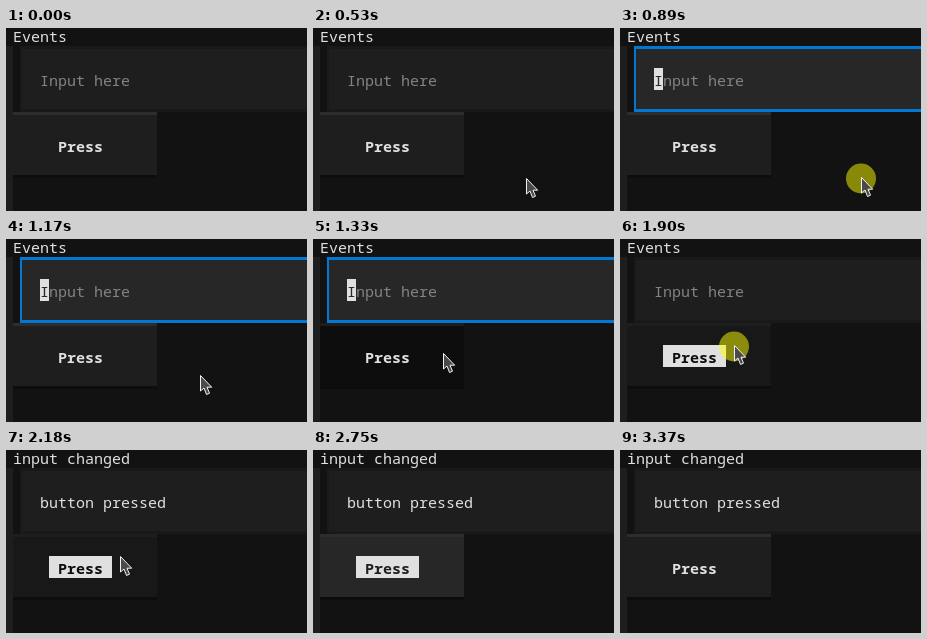
Write an HTML page that moves like this. It is 301 px wide and 183 px high and loops after 3.45 s.

```html
<!DOCTYPE html>
<html lang="en">
<head>
<meta charset="utf-8">
<title>Terminal events demo</title>
<style>
html, body { margin: 0; width: 100%; height: 100%; overflow: hidden; background: #121212; }
svg { display: block; width: 301px; height: 183px; }
text { font: 15px "Noto Sans Mono", monospace; fill: #e0e0e0; white-space: pre; }

.scene, .field, .button, .pointer, .halo, .caret { animation: 3450ms step-end infinite; }
.scene { animation-name: scene; }
.field { animation-name: field; }
.button { animation-name: button; }
.pointer { animation-name: move; }
.halo { animation-name: click; fill: #ff0; }
.caret { animation-name: blink; }

.before { opacity: var(--before); }
.after { opacity: var(--after); }
.hint { fill: #828484; }
.frame { fill: var(--frame); }
.inside { fill: var(--inside); }
.face { fill: var(--face); }
.top { fill: var(--top); }
.bottom { fill: var(--bottom); }
.plate { fill: var(--plate); }
.button text { font-weight: bold; fill: var(--label); }
.arrow { fill: #4a4a4a; stroke: #f2f2f2; stroke-linejoin: round; }

@keyframes scene {
  0% { --before: 1; --after: 0; }
  57.39%, 100% { --before: 0; --after: 1; }
}
@keyframes field {
  0%, 53.91%, 100% { --frame: #191919; --inside: #1e1e1e; }
  25.79% { --frame: #0178d4; --inside: #272727; }
}
@keyframes blink {
  0%, 40.86%, 100% { opacity: 0; }
  25.79% { opacity: 1; }
}
/* idle, hover, hover + focus, active, hover + focus, focus, idle */
@keyframes button {
  0%, 97.68%, 100% { --face: #1e1e1e; --top: #2d2d2d; --bottom: #0d0d0d; --plate: transparent; --label: #e0e0e0; }
  37.39% { --face: #0d0d0d; --top: #1e1e1e; --bottom: #0d0d0d; --plate: transparent; --label: #e0e0e0; }
  55.07%, 63.18% { --face: #181818; --top: #1e1e1e; --bottom: #0d0d0d; --plate: #e0e0e0; --label: #0d0d0d; }
  57.39% { --face: #161616; --top: #161616; --bottom: #242424; --plate: #a2a2a2; --label: #0f0f0f; }
  76.23% { --face: #272727; --top: #2d2d2d; --bottom: #0d0d0d; --plate: #e0e0e0; --label: #1e1e1e; }
}
@keyframes click {
  0%, 28.11%, 58.55%, 100% { opacity: 0; }
  23.47%, 52.75% { opacity: .5; }
}
@keyframes move {
  0% { transform: translate(170px, 190px); }
  10.72% { transform: translate(188px, 180px); animation-timing-function: steps(4); }
  15.36% { transform: translate(213px, 150px); animation-timing-function: steps(3); }
  18.84% { transform: translate(239px, 150px); }
  21.15% { transform: translate(241px, 149px); }
  29.27% { transform: translate(241px, 149px); animation-timing-function: steps(4); }
  33.91% { transform: translate(194px, 136px); animation-timing-function: steps(4); }
  38.55% { transform: translate(130px, 114px); animation-timing-function: steps(2); }
  40.86% { transform: translate(114px, 107px); }
  45.50% { transform: translate(114px, 106px); }
  75.07% { transform: translate(122px, 110px); animation-timing-function: steps(4); }
  79.70%, 100% { transform: translate(310px, 191px); }
}
</style>
</head>
<body>
<svg class="scene" viewBox="0 0 301 183">
  <rect width="301" height="183" fill="#121212"/>
  <rect y="18" width="7" height="165" fill="#1e1e1e"/>
  <text class="before" x="7" y="14">Events</text>
  <text class="after" x="7" y="14">input changed</text>

  <g class="field">
    <rect class="frame" x="14" y="18" width="290" height="66"/>
    <rect class="inside" x="16" y="21" width="288" height="60"/>
    <text class="before hint" x="34" y="58">Input here</text>
    <text class="after" x="34" y="58">button pressed</text>
    <g class="caret">
      <rect x="34" y="40" width="9" height="22" fill="#e0e0e0"/>
      <text x="34" y="58" style="fill: #272727">I</text>
    </g>
  </g>

  <g class="button">
    <rect class="face" x="7" y="84" width="144" height="66"/>
    <rect class="top" x="7" y="84" width="144" height="3"/>
    <rect class="bottom" x="7" y="147" width="144" height="3"/>
    <rect class="plate" x="43" y="106" width="63" height="22"/>
    <text x="52" y="124">Press</text>
  </g>

  <g class="pointer">
    <circle class="halo" cy="1.5" r="15"/>
    <path class="arrow" d="M.5 .5V16L4 13L6.5 19.5L9.5 18.2L7 12.2H11.7Z"/>
  </g>
</svg>
</body>
</html>
```
